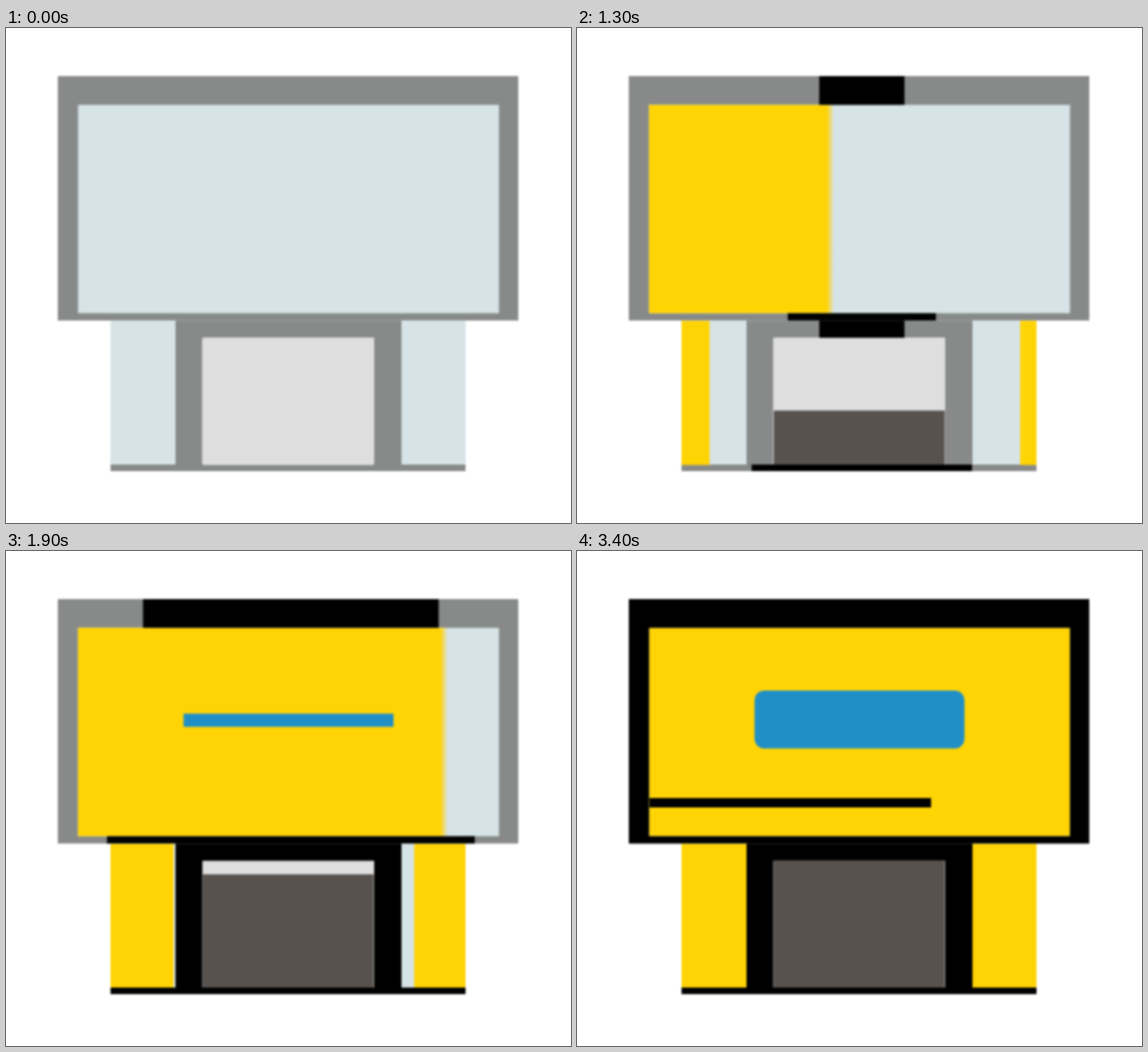
Write an HTML page that moves like this. It is 600 px wide and 525 px high and loops after 8 s.

```html
<!DOCTYPE html>
<html lang="en">
<head>
<meta charset="utf-8">
<title>House being painted</title>
<style>
  html, body { margin: 0; width: 100%; height: 100%; overflow: hidden; background: #fff; }
  svg { display: block; width: 600px; height: 525px; filter: blur(.8px); }
  .grey { fill: #878a88; }
  .glass { fill: #d6e3e7; }
  .yellow { fill: #ffd405; }
  .dark { fill: #58524f; }
</style>
</head>
<body>
<svg viewBox="0 0 600 525">
  <defs>
    <path id="roof" d="M55 51H544V303H523.5V81.5H76.5V303H55Z"/>
    <path id="sill" d="M55 302.5H544V310.3H55Z"/>
    <path id="porch" d="M180 310.3H420V464H391V328.5H208.5V464H180Z"/>
    <path id="base" d="M111 463H488V470H111Z"/>
    <linearGradient id="fadeYellow">
      <stop offset="0" stop-color="#ffd405"/>
      <stop offset="1" stop-color="#ffd405" stop-opacity="0"/>
    </linearGradient>
    <linearGradient id="fadeBlack">
      <stop offset="0"/>
      <stop offset="1" stop-opacity="0"/>
    </linearGradient>
    <clipPath id="windowClip"><rect x="76.5" y="81.5" width="447" height="221"/></clipPath>
    <clipPath id="lineClip"><rect x="77" y="262" width="299" height="10"/></clipPath>
    <clipPath id="roofClip"><rect id="roofWipe" y="0" height="525"/></clipPath>
    <clipPath id="sillClip"><rect id="sillWipe" y="0" height="525"/></clipPath>
    <clipPath id="baseClip"><rect id="baseWipe" y="0" height="525"/></clipPath>
    <clipPath id="signClip"><rect id="signWipe" x="180" width="240"/></clipPath>
  </defs>

  <rect class="glass" x="76" y="81" width="448" height="222"/>
  <rect class="glass" x="111" y="310.5" width="377" height="153"/>
  <g class="grey">
    <use href="#roof"/><use href="#sill"/><use href="#porch"/><use href="#base"/>
  </g>
  <rect x="208.5" y="328.5" width="182.5" height="135" rx="2" fill="#dedede"/>

  <g clip-path="url(#windowClip)">
    <g id="wall">
      <rect class="yellow" x="-500" y="81" width="497" height="222"/>
      <rect x="-3.5" y="81" width="8" height="222" fill="url(#fadeYellow)"/>
    </g>
  </g>
  <rect id="left" class="yellow" x="111" y="310.5" height="153"/>
  <rect id="right" class="yellow" y="310.5" height="153"/>
  <rect id="door" class="dark" x="209" width="181.5"/>

  <g clip-path="url(#roofClip)"><use href="#roof"/><use href="#porch"/></g>
  <g clip-path="url(#sillClip)"><use href="#sill"/></g>
  <g clip-path="url(#baseClip)"><use href="#base"/></g>

  <g clip-path="url(#signClip)">
    <rect x="188.5" y="148" width="223" height="61.5" rx="10" fill="#208fc6"/>
  </g>
  <g clip-path="url(#lineClip)">
    <g id="line">
      <rect x="-400" y="262" width="395" height="10"/>
      <rect x="-5.5" y="262" width="10" height="10" fill="url(#fadeBlack)"/>
    </g>
  </g>
</svg>
<script>
  const LOOP = 8000, STEP = 100, CENTER = 302.5;
  const el = id => document.getElementById(id);
  const set = (id, attrs) => {
    for (const key in attrs) el(id).setAttribute(key, attrs[key]);
  };
  const ramp = (t, start, length) => Math.min(1, Math.max(0, (t - start) / length));
  const ease = (t, start, length) => (1 - Math.cos(Math.PI * ramp(t, start, length))) / 2;

  // Black paint spreads sideways from the middle.
  function spread(id, t) {
    const width = Math.max(0, 552 * ease(t, 720, 2160) - 2);
    set(id, { x: CENTER - width / 2, width });
  }

  function draw(t) {
    spread("roofWipe", t);
    spread("sillWipe", t + 200);
    spread("baseWipe", t + 400);

    const wall = ease(t, 400, 2000);
    set("wall", { transform: `translate(${wall ? 77 + 454 * wall : 0})` });

    const side = time => 69 * ramp(time, 820, 1113);
    const right = side(t - 200);
    set("left", { width: side(t) });
    set("right", { x: 488 - right, width: right });

    const rise = 135 * ramp(t, 748, 1290);
    set("door", { y: 463.5 - rise, height: rise });

    const sign = 62 * ease(t, 1420, 1520);
    set("signWipe", { y: 179.5 - sign / 2 - (sign > 61 ? 1 : 0), height: sign + (sign > 61 ? 2 : 0) });

    const line = ease(t, 2100, 1300);
    set("line", { transform: `translate(${line ? 77 + 305 * line : 0})` });
  }

  const start = performance.now();
  function tick() {
    const t = (performance.now() - start) % LOOP;
    draw(Math.floor(t / STEP) * STEP);
    requestAnimationFrame(tick);
  }
  tick();
</script>
</body>
</html>
```
